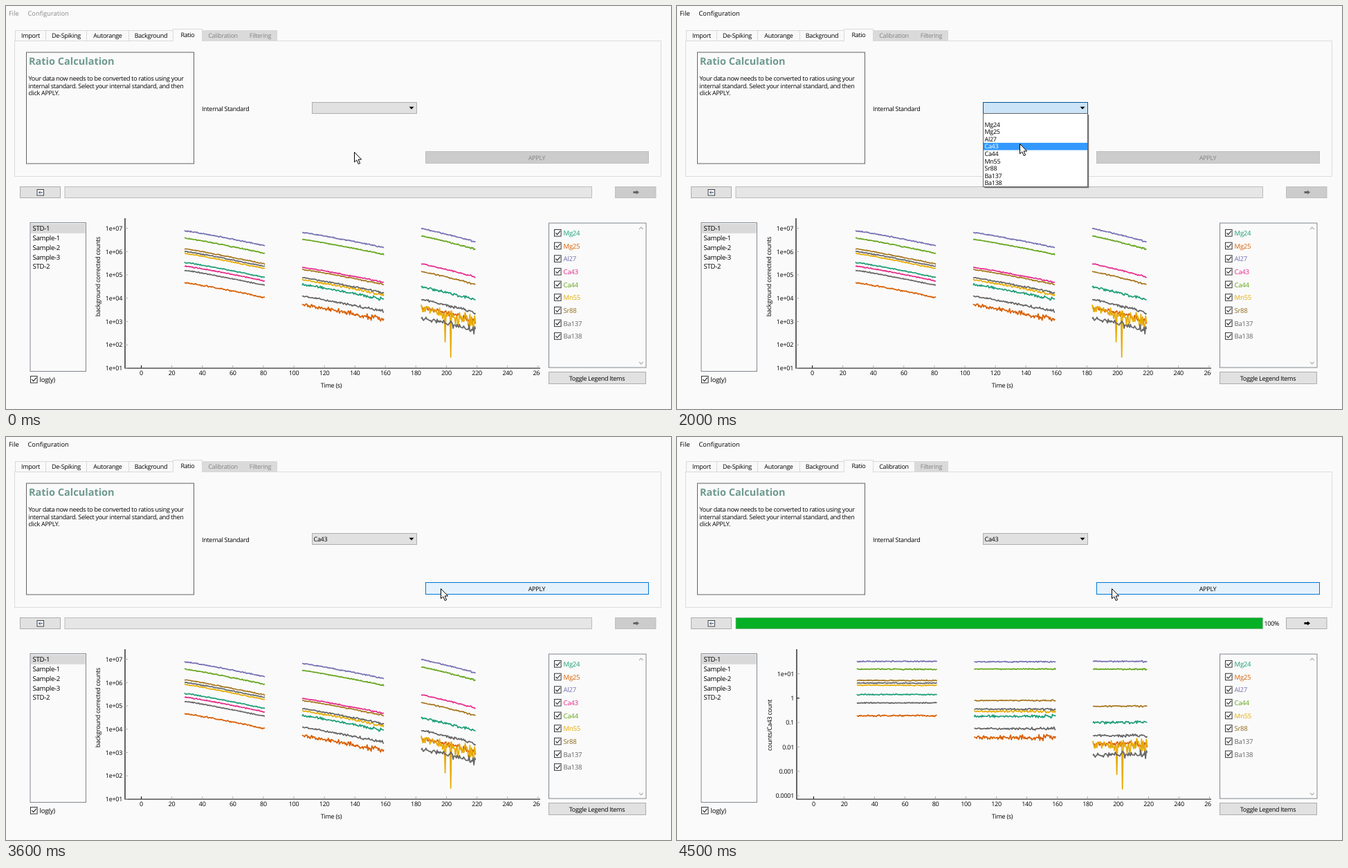
Animation of 961x583 px, one loop 8.5 s. Source, as an HTML page:

```html
<!DOCTYPE html>
<html lang="en">
<head>
<meta charset="utf-8">
<title>Ratio Calculation</title>
<style>
html, body { margin: 0; width: 100%; height: 100%; overflow: hidden; background: #fafafa; }
svg { display: block; width: 100vw; height: 100vh; }
text { font: 9px "Open Sans", "Noto Sans", sans-serif; letter-spacing: -0.28px; text-rendering: geometricPrecision; white-space: pre; }
text.menu { font-size: 9.3px; letter-spacing: 0; }
text.list { font-size: 9.6px; }
text.title { font-size: 14.5px; font-weight: 700; letter-spacing: 0; }
</style>
</head>
<body>
<svg id="stage" viewBox="0 0 961 583"></svg>
<script>
const LOOP = 8500, STEP = 100;
const EDGE = '#adadad', FACE = '#e1e1e1', OFF = '#cccccc', OFF_EDGE = '#bfbfbf', OFF_TEXT = '#838383';
const TAB = '#f9f9f9', OFF_TAB = '#dadada';
const HOVER = '#e5f1fb', HOVER_EDGE = '#0078d7', DOWN = '#cce4f7', DOWN_EDGE = '#005499';

const rect = (x, y, w, h, fill, stroke = 'none', id = '') =>
  `<rect id="${id}" x="${x}" y="${y}" width="${w}" height="${h}" fill="${fill}" stroke="${stroke}"/>`;
const text = (x, y, s, fill = '#000', anchor = 'start', extra = '') =>
  `<text x="${x}" y="${y}" fill="${fill}" text-anchor="${anchor}" ${extra}>${s}</text>`;
const path = (d, stroke, width = 1, extra = 'fill="none"') =>
  `<path d="${d}" stroke="${stroke}" stroke-width="${width}" ${extra}/>`;
const group = (id, body, extra = '') => `<g id="${id}" ${extra}>${body}</g>`;
const checkbox = (x, y) => rect(x + .5, y + .5, 9.6, 9.6, '#fff', '#333') +
  path(`M${x + 2.3} ${y + 5.2}l2.3 2.4 4.3-5`, '#222', 1.1);

// name, colour, start height per segment, noise per segment
const elements = [
  ['Mg24', '#1b9e77', [370.8, 402.8, 406.5], [.9, 2.4, 2.8]],
  ['Mg25', '#d95f02', [400, 432.5, 436.5], [1.4, 4.2, 5.5]],
  ['Al27', '#7570b3', [325, 327.5, 322], [1.1, 1.1, 1.1]],
  ['Ca43', '#e7298a', [376, 378, 373], [.9, 1, 1]],
  ['Ca44', '#66a61e', [335.8, 337.6, 332.8], [1, 1, 1.1]],
  ['Mn55', '#e6ab02', [358, 396, 437.5], [1, 2.2, 9]],
  ['Sr88', '#a6761d', [351.3, 381, 384], [1, 1.2, 1.2]],
  ['Ba137', '#666666', [382.3, 420, 451.5], [.8, 2, 6]],
  ['Ba138', '#666666', [355, 393, 424.5], [1, 1.5, 2.6]]
];
const segments = [[258, 374, 21.8], [428, 546, 21.8], [600, 678.5, 19]];
const STANDARD = elements[3];

let seed = 41;
const random = () => (seed = (seed * 16807) % 2147483647) / 2147483647;
const noise = () => random() + random() - 1;

function makeCurve([name, , heights, amounts]) {
  const paths = ['', ''];
  segments.forEach(([x0, x1, drop], s) => {
    const n = Math.round((x1 - x0) / 1.15);
    for (let i = 0; i <= n; i++) {
      const p = i / n, x = x0 + (x1 - x0) * p;
      const fall = drop * p ** 1.1;
      let jitter = noise() * amounts[s] * (s ? .65 + .6 * p : 1);
      if (name === 'Mn55' && s === 2) {
        if (random() < .1) jitter += 12 * random() * (p > .25);
        if (i === Math.round(.446 * n)) jitter = 486 - heights[s] - fall;
        if (i === Math.round(.54 * n)) jitter = 508 - heights[s] - fall;
      }
      const y = heights[s] + jitter;
      const rx = 197.5 + (x - 195.5) / 2.205 * 2.2;
      const ry = 378 + 1.047 * (y - STANDARD[2][s]);
      const cmd = i ? 'L' : 'M';
      paths[0] += cmd + x.toFixed(1) + ' ' + (y + fall).toFixed(1);
      paths[1] += cmd + rx.toFixed(1) + ' ' + ry.toFixed(1);
    }
  });
  return paths;
}
const curves = elements.map(makeCurve);

function plot(id, k, axisX, zeroX, scale, labels, top, gap, title, titleY) {
  let out = path(`M${axisX} 307V524H772`, '#000', 1.2);
  for (let t = 0; t <= 260; t += 20) {
    const x = zeroX + t * scale;
    out += path(`M${x} 523.5V520`, t ? '#aaa' : '#000');
    out += text(x, 534, t, '#000', 'middle', t === 260 ? 'clip-path="url(#edge)"' : '');
  }
  labels.forEach((s, i) => {
    const y = top + i * gap;
    out += path(`M${axisX} ${y}h4`, s === '1' ? '#000' : '#aaa') + text(axisX - 4, y + 3.3, s, '#000', 'end');
  });
  out += text(0, 0, title, '#000', 'middle', `transform="translate(${axisX - 36} ${titleY}) rotate(-90)"`);
  out += text(470, 552, 'Time (s)', '#000', 'middle');
  const shown = elements.filter(e => !k || e !== STANDARD);
  shown.forEach((e, i) => {
    out += path(curves[elements.indexOf(e)][k], e[1], 1.7, 'fill="none" stroke-linejoin="round"');
    const y = 328 + i * 18.65, ink = e[0] === 'Sr88' ? '#8f6b1d' : e[1];
    out += checkbox(792, y - 5) + text(805.5, y + 4, e[0], ink, 'start', 'class="list"');
  });
  return group(id, out);
}

function tabs() {
  const names = ['Import', 'De-Spiking', 'Autorange', 'Background', 'Ratio', 'Calibration', 'Filtering'];
  const edges = [13.5, 57.5, 116.5, 177.5, 241.5, 283.5, 343.5, 391.5];
  return names.map((s, i) => {
    const x = edges[i], w = edges[i + 1] - x, on = i === 4, off = i > 4;
    const box = on
      ? rect(x, 33.5, w, 18, '#fafafa') + path(`M${x} 50.5v-17h${w}v17`, '#d9d9d9')
      : rect(x, 35.5, w, 15, off ? OFF_TAB : TAB, '#d9d9d9', 'tab' + i);
    return box + text(x + w / 2, on ? 45.3 : 46.3, s, off ? OFF_TEXT : '#000', 'middle', `id="tabText${i}"`);
  }).join('');
}

const choices = ['', ...elements.map(e => e[0])];
const ROW = 10.6;
const popup = rect(445, 158, 151, 106, '#000', 'none').replace('/>', ' opacity=".12"/>') +
  rect(444, 157, 151, 106, '#777') +
  rect(442.5, 155.5, 151, 106, '#fff', '#646464') +
  rect(443, 155.5, 150, ROW, '#3399ff', 'none', 'mark') +
  choices.map((s, i) => text(444.5, 164 + i * ROW, s, '#000', 'start', `id="choice${i}"`)).join('');

const stage = document.getElementById('stage');
stage.innerHTML =
  '<defs><clipPath id="edge"><rect x="740" y="520" width="32" height="20"/></clipPath></defs>' +
  rect(0, 0, 961, 583, '#fafafa') +
  group('menu', text(4, 13.7, 'File', 'inherit', 'start', 'class="menu"') +
    text(31.5, 13.7, 'Configuration', 'inherit', 'start', 'class="menu"')).replaceAll('fill="inherit"', '') +
  rect(12.5, 50.5, 934, 196, '#fafafa', '#dcdcdc') + tabs() +
  rect(29.5, 67, 242, 161, '#fafafa', '#646464') +
  text(33, 85, 'Ratio Calculation', '#6f9a90', 'start', 'class="title"') +
  text(32.5, 108, 'Your data now needs to be converted to ratios using your') +
  text(32.5, 118.5, 'internal standard. Select your internal standard, and then') +
  text(32.5, 129, 'click APPLY.') +
  text(283, 151.5, 'Internal Standard') +
  rect(442.5, 139.5, 151, 16, FACE, EDGE, 'combo') +
  text(444.5, 151.3, 'Ca43', '#000', 'start', 'id="value"') +
  path('M582.5 145.7h7l-3.5 3.8z', 'none', 0, 'fill="#000"') +
  rect(606.5, 210.5, 322, 17, OFF, OFF_EDGE, 'apply') +
  text(767, 222.5, 'APPLY', OFF_TEXT, 'middle', 'id="applyText"') +
  rect(20.5, 261.5, 58, 16, FACE, EDGE) +
  rect(45, 265.5, 9.5, 8.5, '#f4f6fb', '#444') + path('M53 269.8H47.5M49.5 268l-2 1.8 2 1.8', '#34466a') +
  rect(85, 261.5, 761.5, 16, '#e6e6e6', '#bcbcbc') +
  rect(85.2, 261.7, 761, 15.6, '#06b025', 'none', 'bar') +
  text(848.5, 272.8, '100%', '#000', 'start', 'id="percent"') +
  rect(880.5, 261.5, 58.5, 16, OFF, OFF_EDGE, 'next') +
  path('M906.5 268h4.5v-1.5l4 3-4 3V271h-4.5z', 'none', 0, 'id="nextArrow" fill="#666"') +
  rect(35, 313.5, 80.5, 215, '#fafafa', '#828790') +
  rect(36, 315, 78.5, 13.8, '#d9d9d9') +
  ['STD-1', 'Sample-1', 'Sample-2', 'Sample-3', 'STD-2'].map((s, i) =>
    text(38.5, 325.3 + i * 13.75, s, '#000', 'start', 'class="list"')).join('') +
  checkbox(35, 535) + text(48.5, 544, 'log(y)', '#000', 'start', 'class="list"') +
  rect(784.5, 314, 140.5, 209, '#fafafa', '#828790') +
  path('M915 323l2.8-2.8 2.8 2.8M915 515l2.8 2.8 2.8-2.8', '#b0b0b0', 1.2) +
  rect(784.5, 529.5, 140, 17, FACE, EDGE) + text(854, 541.7, 'Toggle Legend Items', '#000', 'middle') +
  plot('counts', 0, 172, 195.5, 2.205, ['1e+07', '1e+06', '1e+05', '1e+04', '1e+03', '1e+02', '1e+01'],
    321.5, 33.73, 'background corrected counts', 391.5) +
  plot('ratios', 1, 173, 197.5, 2.2, ['1e+01', '1', '0.1', '0.01', '0.001', '0.0001'],
    342.5, 35.3, 'counts/Ca43 count', 417) +
  group('popup', popup) +
  group('cursor', path('M.5.5V14.8L3.8 11.9 6.3 17.6 8.6 16.6 6.2 11H10.6z', '#000', 1, 'fill="#fff"'));

const el = id => document.getElementById(id);
const set = (id, attrs) => { for (const k in attrs) el(id).setAttribute(k, attrs[k]); };
const show = (id, on) => set(id, { visibility: on ? 'visible' : 'hidden' });
const progress = (t, a, b) => Math.min(1, Math.max(0, (t - a) / (b - a)));
const easeOut = p => 1 - (1 - p) ** 2;
const smooth = p => p * p * (3 - 2 * p);
const lerp = (a, b, p) => a + (b - a) * p;
const channel = (c, i) => parseInt(c.slice(1 + 2 * i, 3 + 2 * i), 16);
const mix = (a, b, p) => `rgb(${[0, 1, 2].map(i => Math.round(lerp(channel(a, i), channel(b, i), p)))})`;

function cursorAt(t) {
  if (t < 1200) {
    const p = smooth(progress(t, 0, 900));
    return [lerp(503, 494, p), lerp(211, 151, p)];
  }
  if (t < 2500) {
    const p = progress(t, 1300, 2000);
    return [lerp(494, 495, p), lerp(t < 1300 ? 151 : 157, 199, p)];
  }
  const p = easeOut(progress(t, 2800, 3600));
  return [lerp(495, 628, p), lerp(199, 219, p)];
}

function comboLook(t) {
  if (t >= 1000 && t < 2300) return [DOWN, DOWN_EDGE];
  const p = t < 1000 ? progress(t, 700, 1000) : 1 - progress(t, 2200, 2500);
  const [fill, edge] = t < 1000 ? [HOVER, HOVER_EDGE] : [DOWN, DOWN_EDGE];
  return [mix(FACE, fill, p), mix(EDGE, edge, p)];
}

function applyLook(t) {
  if (t < 3300) {
    const p = progress(t, 2200, 2500);
    return [mix(OFF, FACE, p), mix(OFF_EDGE, EDGE, p)];
  }
  if (t < 4100) {
    const p = progress(t, 3300, 3600);
    return [mix(FACE, HOVER, p), mix(EDGE, HOVER_EDGE, p)];
  }
  const p = progress(t, 4200, 4500);
  return [mix(DOWN, HOVER, p), mix(DOWN_EDGE, HOVER_EDGE, p)];
}

function draw(time) {
  const t = Math.floor(time % LOOP / STEP) * STEP;
  const [x, y] = cursorAt(t).map(Math.round);
  set('cursor', { transform: `translate(${x} ${y})` });
  set('menu', { fill: t < 100 ? '#8a8a8a' : '#000' });

  const open = t >= 1000 && t < 2300;
  const row = Math.max(0, Math.floor((y - 155.5) / ROW));
  show('popup', open);
  set('mark', { y: 155.5 + row * ROW });
  choices.forEach((s, i) => set('choice' + i, { fill: i === row ? '#fff' : '#000' }));
  show('value', t >= 2300);

  const [comboFill, comboEdge] = comboLook(t);
  set('combo', { fill: comboFill, stroke: comboEdge });
  const [applyFill, applyEdge] = applyLook(t);
  set('apply', { fill: applyFill, stroke: applyEdge });
  set('applyText', { fill: t < 2300 ? OFF_TEXT : '#000' });

  const done = t >= 4300;
  show('counts', !done);
  show('ratios', done);
  show('percent', done);
  set('bar', { width: 761 * progress(t, 4200, 4500) });
  set('next', { fill: done ? FACE : OFF, stroke: done ? EDGE : OFF_EDGE });
  set('nextArrow', { fill: done ? '#000' : '#666' });
  set('tab5', { fill: done ? TAB : OFF_TAB });
  set('tabText5', { fill: done ? '#000' : OFF_TEXT });
}

const start = performance.now();
function frame() {
  draw(performance.now() - start);
  requestAnimationFrame(frame);
}
frame();
</script>
</body>
</html>
```
